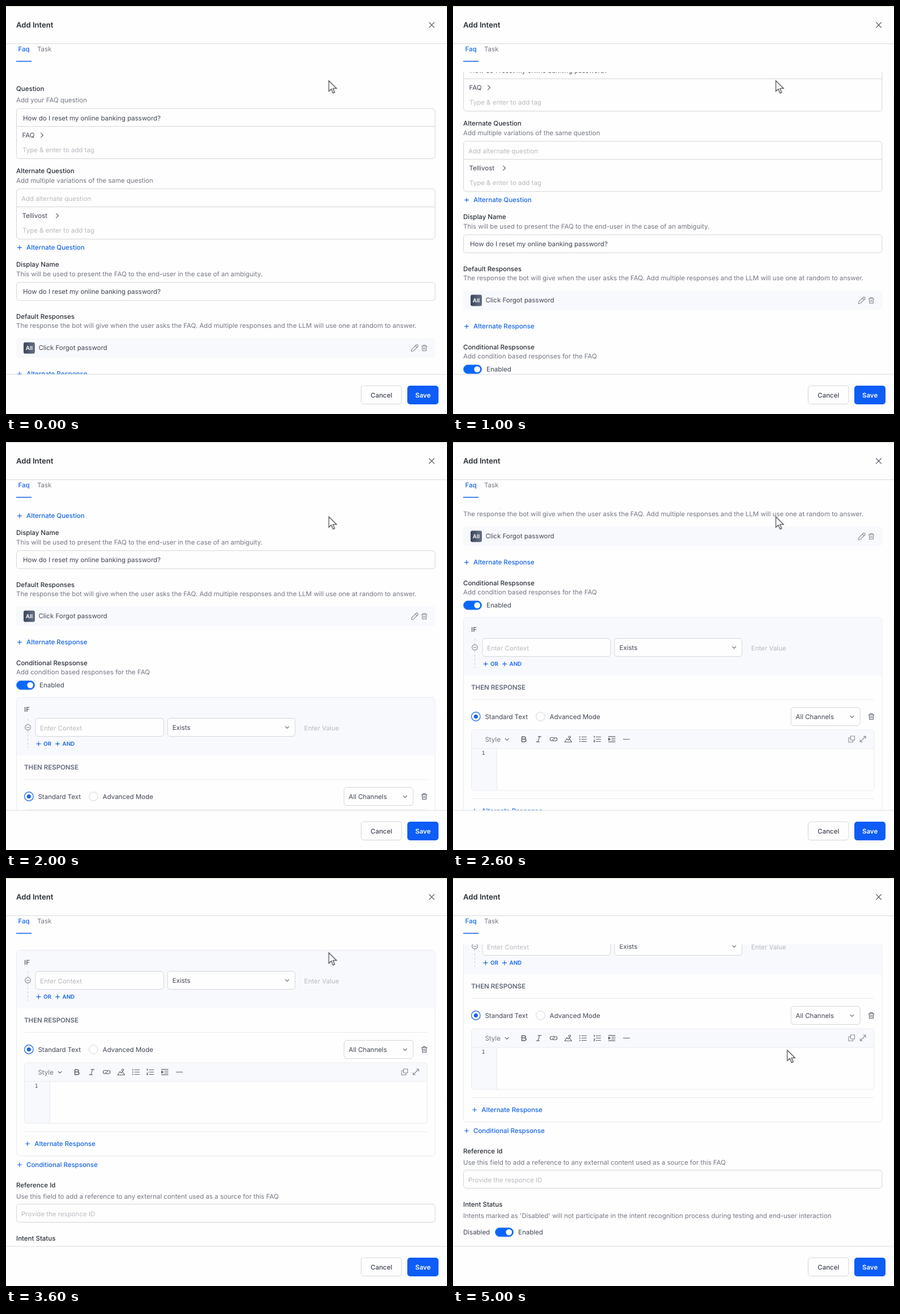
An HTML page that plays this animation: 778x720 px, repeating every 5.2 s.

```html
<!DOCTYPE html>
<html lang="en">
<head>
<meta charset="utf-8">
<title>Add Intent</title>
<style>
@property --s { syntax: "<number>"; inherits: true; initial-value: 0; }
html, body { margin: 0; width: 100%; height: 100%; overflow: hidden; background: #fefefe; }
svg {
  display: block; width: 778px; height: 720px;
  font: 400 11.49px Inter, Arial, sans-serif;
  text-rendering: geometricPrecision;
  animation: scroll 5.2s step-end infinite;
}
text { fill: #414653; white-space: pre; }
.label { fill: #2b3038; font-weight: 500; }
.note { fill: #747882; }
.hint { fill: #b7babf; }
.link { fill: #1766e4; font-weight: 500; }
.caps { fill: #626979; font-weight: 600; }
.small { fill: #1766e4; font-weight: 600; font-size: 9.8px; }
.box { fill: #fefefe; stroke: #d3d5d9; }
.rule { fill: none; stroke: #e9ebef; }
.tint { fill: #f8f9fc; }
.ico { fill: none; stroke: #5a606b; stroke-width: 1.1; stroke-linecap: round; stroke-linejoin: round; }
.blue { stroke: #1766e4; stroke-width: 1.2; }
.pale { stroke: #858a94; }
#page { transform: translateY(calc(var(--s) * -1px)); }
#thumb { transform: translateY(calc(var(--s) * .439px)); }
#cursor { animation: point 5.2s step-end infinite; }
@keyframes scroll {
  0% { --s: 0 }
  15.38% { --s: 49.2 }
  19.23% { --s: 84 }
  23.07% { --s: 119 }
  26.92% { --s: 154 }
  30.76% { --s: 225 }
  38.46% { --s: 296 }
  42.3% { --s: 366 }
  49.99% { --s: 437 }
  53.84% { --s: 478 }
  57.69% { --s: 518 }
  61.53% { --s: 559 }
  65.38% { --s: 589 }
  69.23% { --s: 619 }
  73.07% { --s: 649 }
  76.92%, 100% { --s: 679 }
}
@keyframes point {
  0% { transform: translate(569.5px, 131.7px) }
  88.46% { transform: translate(569.5px, 132.5px) }
  92.3% { transform: translate(578.5px, 259.5px) }
  96.15%, 100% { transform: translate(589.7px, 303.7px) }
}
</style>
</head>
<body>
<svg viewBox="0 0 778 720">
  <defs>
    <clipPath id="view"><rect y="117" width="778" height="533"/></clipPath>
    <linearGradient id="badge"><stop stop-color="#3d465c"/><stop offset="1" stop-color="#667083"/></linearGradient>
    <path id="plus" d="M-3.5 0H3.5M0-3.5V3.5"/>
    <path id="right" d="M-2-3.8L2 0L-2 3.8"/>
    <path id="down" d="M-3-1.5L0 1.5L3-1.5"/>
    <path id="trash" d="M-4.8-3.3H4.8M-2-3.3V-5H2V-3.3M-3.8-3.3L-3.3 5H3.3L3.8-3.3M-1.2-.8V2.6M1.2-.8V2.6"/>
    <g id="toggle">
      <rect x=".5" y=".3" width="32" height="15.6" rx="7.8" fill="#0a67fb" stroke="#4a86e4"/>
      <circle cx="24.7" cy="8.1" r="5.4" fill="#fff"/>
    </g>
  </defs>

  <rect width="778" height="720" fill="#fefefe"/>

  <g clip-path="url(#view)">
    <g id="page">
      <text class="label" x="18" y="150">Question</text>
      <text class="note" x="18" y="170">Add your FAQ question</text>
      <rect class="box" x="18.5" y="181" width="738.5" height="88.5" rx="5"/>
      <path class="box" d="M18.5 212.5H757"/>
      <text x="30" y="202">How do I reset my online banking password?</text>
      <text x="28.5" y="232">FAQ</text>
      <use href="#right" class="ico" x="63.5" y="228"/>
      <text class="hint" x="29" y="257.5">Type &amp; enter to add tag</text>

      <text class="label" x="18" y="295">Alternate Question</text>
      <text class="note" x="18" y="311.7">Add multiple variations of the same question</text>
      <rect class="box" x="18.5" y="322.8" width="738.5" height="88.5" rx="5"/>
      <path class="box" d="M18.5 354.5H757"/>
      <text class="hint" x="27" y="343.7">Add alternate question</text>
      <text x="28.5" y="374">Tellivost</text>
      <use href="#right" class="ico" x="90.5" y="370"/>
      <text class="hint" x="29" y="399.5">Type &amp; enter to add tag</text>
      <use href="#plus" class="ico blue" x="24" y="426.3"/>
      <text class="link" x="36" y="430.4">Alternate Question</text>

      <text class="label" x="18" y="460">Display Name</text>
      <text class="note" x="18" y="476.6">This will be used to present the FAQ to the end-user in the case of an ambiguity.</text>
      <rect class="box" x="18.5" y="487.7" width="738.5" height="32" rx="5"/>
      <text x="30" y="508.2">How do I reset my online banking password?</text>

      <text class="label" x="18" y="552">Default Responses</text>
      <text class="note" x="18" y="568.4">The response the bot will give when the user asks the FAQ. Add multiple responses and the LLM will use one at random to answer.</text>
      <rect class="tint" x="18" y="586" width="739" height="35" rx="5"/>
      <rect x="31" y="593.5" width="20" height="20" rx="3" fill="url(#badge)"/>
      <text x="41" y="607.2" text-anchor="middle" style="fill:#fff;font-weight:600;font-size:9.8px">All</text>
      <text x="57.4" y="607.4">Click Forgot password</text>
      <path class="ico pale" d="M715.2 609.5L716 605.8L723.8 598Q725.3 597 726.6 598.4T726.7 601L718.9 608.7ZM722.3 599.6L725.1 602.4"/>
      <use href="#trash" class="ico pale" x="738" y="603.5"/>
      <use href="#plus" class="ico blue" x="24" y="649.3"/>
      <text class="link" x="36" y="653.4">Alternate Response</text>

      <text class="label" x="18" y="689.7">Conditional Respsonse</text>
      <text class="note" x="18" y="706.2">Add condition based responses for the FAQ</text>
      <use href="#toggle" x="18" y="717"/>
      <text x="59" y="729">Enabled</text>

      <rect class="rule" x="18.5" y="746.5" width="738.5" height="363" rx="5"/>
      <path class="tint" d="M19 849V752Q19 747 24 747H751.5Q756.5 747 756.5 752V849Z"/>
      <text class="caps" x="32" y="772.2">IF</text>
      <path d="M38.5 784V836" stroke="#ced2da" stroke-dasharray="4 3"/>
      <circle class="ico pale" cx="38.5" cy="799.5" r="4.9" style="fill:#f8f9fc"/>
      <path class="ico pale" d="M36.2 799.5H40.8"/>
      <rect class="box" x="52" y="783.5" width="226" height="32" rx="5"/>
      <text class="hint" x="60" y="804.5">Enter Context</text>
      <rect class="box" x="285" y="783.5" width="225" height="32" rx="5"/>
      <text x="293.5" y="804">Exists</text>
      <use href="#down" class="ico" x="496" y="799.7"/>
      <rect x="517.5" y="783.5" width="225.5" height="32" rx="5" fill="none" stroke="#f4f6fa"/>
      <text class="hint" x="526" y="804.5">Enter Value</text>
      <use href="#plus" class="ico blue" x="57.5" y="828.7"/>
      <text class="small" x="66" y="832.3">OR</text>
      <use href="#plus" class="ico blue" x="91" y="828.7"/>
      <text class="small" x="99.5" y="832.3">AND</text>

      <text class="caps" x="32" y="874.2">THEN RESPONSE</text>
      <path class="rule" d="M32 891.5H743"/>
      <circle cx="40.3" cy="921.5" r="7.8" fill="#fefefe" stroke="#1766e4" stroke-width="1.2"/>
      <circle cx="40.3" cy="921.5" r="3.6" fill="#1766e4"/>
      <text x="56.5" y="925.7">Standard Text</text>
      <circle class="box" cx="154.3" cy="921.5" r="7.8"/>
      <text x="170.5" y="925.7">Advanced Mode</text>
      <rect class="box" x="596.3" y="905.5" width="122" height="32" rx="5"/>
      <text x="604.5" y="925.7">All Channels</text>
      <use href="#down" class="ico" x="704" y="921.8"/>
      <use href="#trash" class="ico" x="738" y="921.5"/>

      <path class="tint" d="M33 978V950Q33 945.5 38 945.5H738Q743 945.5 743 950V978H77.5V1052H38Q33 1052 33 1047Z"/>
      <rect class="rule" x="32.5" y="945" width="710.5" height="107" rx="5"/>
      <path class="rule" d="M33 978H743M77.5 978V1052"/>
      <text class="note" x="56.5" y="965.7">Style</text>
      <use href="#down" class="ico" x="95" y="961.8"/>
      <g class="ico" transform="translate(0 961.5)">
        <path stroke-width="1.5" d="M121.5-4.3H125.6Q128-4 128-2T125.6-.2H121.5M125.6-.2Q129 0 129 2.1T125.8 4.5H121.5V-4.3"/>
        <path d="M150-4.6H155.5M147 4.6H152.5M152.8-4.6L149.8 4.6"/>
        <path d="M176.3 2.8H174.2A2.9 2.9 0 0 1 174.2-3H176Q179-2.6 179 0M178.7-2.8H180.8A2.9 2.9 0 0 1 180.8 3H179Q176 2.6 176 0"/>
        <path d="M197 5L201-.8L203.2 1.6L205.3-.7L209.5 5Z"/>
        <circle cx="205.8" cy="-3.7" r="1.8"/>
        <path d="M227-4H235.5M227 0H235.5M227 4H235.5"/>
        <path stroke-width="2" d="M223.7-4h.1M223.7 0h.1M223.7 4h.1"/>
        <path d="M252.5-4H260.5M252.5 0H260.5M252.5 4H260.5M248.5-5L249.4-5.3V-2.5M248.4 1.6Q250.5 1 249.8 2.6L248.4 4.8H250.2"/>
        <path d="M274.3-4.6H286M280-1.5H286M280 1.5H286M274.3 4.6H286"/>
        <path fill="#5a606b" d="M274.5-2L277.3 0L274.5 2Z"/>
        <path d="M300.5 0H311.5"/>
        <path class="pale" d="M701.5-5.5H708.5V1.5H701.5ZM701-2.5H698V5H705.5V2"/>
        <path class="pale" d="M718.5 4.5L727.8-5M724-5.2H728V-1.2M722.3 4.7H718.3V.7"/>
      </g>
      <text x="50.7" y="989" style="font:500 9.3px 'DejaVu Sans Mono',monospace">1</text>

      <path class="rule" d="M32 1066.5H743"/>
      <use href="#plus" class="ico blue" x="38" y="1088"/>
      <text class="link" x="50.3" y="1092.2">Alternate Response</text>
      <use href="#plus" class="ico blue" x="24" y="1125"/>
      <text class="link" x="36" y="1129.2">Conditional Respsonse</text>

      <text class="label" x="18" y="1165.3">Reference Id</text>
      <text class="note" x="18" y="1185.2">Use this field to add a reference to any external content used as a source for this FAQ</text>
      <rect class="box" x="18.5" y="1194.5" width="738.5" height="32" rx="5"/>
      <text class="hint" x="27" y="1215.5">Provide the responce ID</text>

      <text class="label" x="18" y="1259">Intent Status</text>
      <text class="note" x="18" y="1278.6">Intents marked as 'Disabled' will not participate in the intent recognition process during testing and end-user interaction</text>
      <text x="18" y="1308">Disabled</text>
      <use href="#toggle" x="74" y="1296"/>
      <text x="115" y="1308">Enabled</text>
    </g>
  </g>

  <rect width="778" height="1.5" fill="#e4e6d8"/>
  <text class="label" x="18" y="38.4" style="font-size:13.1px;font-weight:600">Add Intent</text>
  <path class="ico" d="M746.5 29L755.5 38M755.5 29L746.5 38"/>
  <path d="M0 66.5H778M0 650H778" stroke="#d9dbde"/>
  <text class="link" x="21.5" y="79.7">Faq</text>
  <text class="note" x="55" y="79.7">Task</text>
  <rect x="18" y="96.8" width="27" height="1.6" fill="#1766e4"/>
  <rect id="thumb" x="777" y="118" width="1" height="234" fill="#f0f1f2"/>

  <rect class="box" x="626.5" y="670" width="71.5" height="32.5" rx="5"/>
  <text x="662.3" y="690.6" text-anchor="middle" font-weight="500">Cancel</text>
  <rect x="708" y="670" width="55" height="33" rx="5" fill="#0d5df6"/>
  <text x="735.6" y="690.6" text-anchor="middle" style="fill:#fff;font-weight:600">Save</text>

  <path id="cursor" d="M0 0V18.8L4.3 14.8L7.5 22L10.4 20.7L7.3 13.8H13.7Z" fill="#fff" stroke="#2a2c31" stroke-width="1.1"/>
</svg>
</body>
</html>
```
